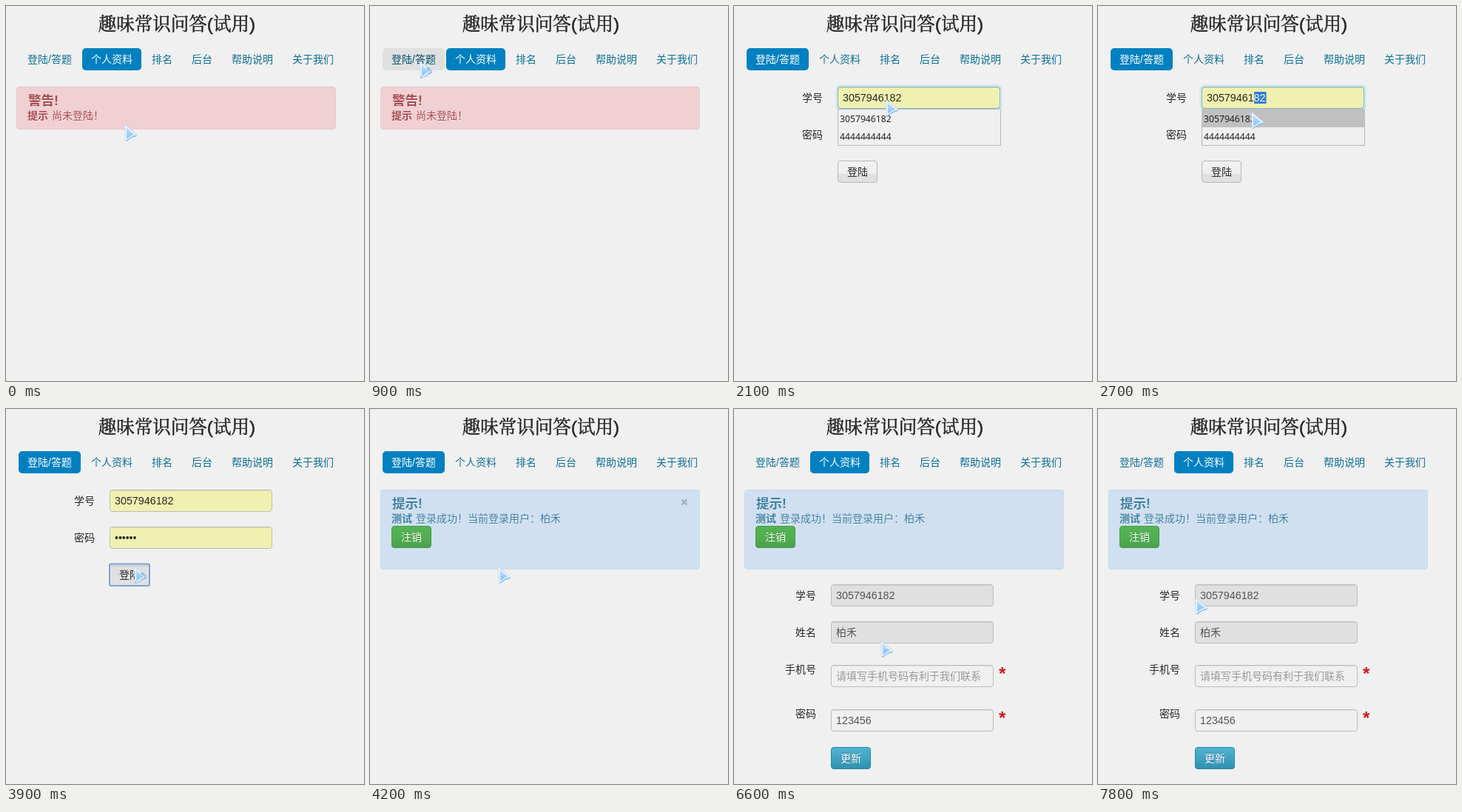
Recreate the animation shown at these times as an HTML page. Size 484x507 px, loop 8000 ms.

```html
<!DOCTYPE html>
<html lang="zh-CN">
<head>
<meta charset="utf-8">
<title>趣味常识问答</title>
<style>
  html, body { margin: 0; width: 100%; height: 100%; overflow: hidden; background: #f0f0f0; }
  svg { display: block; width: 484px; height: 507px; }
  text { font: 14px "Liberation Sans", "Noto Sans CJK SC", "Noto Sans CJK", sans-serif; fill: #282828; white-space: pre; }
  .title { font: 500 24.5px "Liberation Sans", "Noto Serif CJK SC", "Noto Sans CJK SC", serif; text-anchor: middle; fill: #262626; stroke: #262626; stroke-width: .5px; }
  .bold { font-weight: 700; }
  .head { font-size: 17.5px; font-weight: 700; }
  .num { font-size: 14.3px; }
  .list { font: 12.2px "Noto Sans", sans-serif; fill: #222; }
  .warn { fill: #a84a50; text-shadow: 0 1px 0 #fff8; }
  .info { fill: #3e7fa2; text-shadow: 0 1px 0 #fff8; }
  .light { fill: #fff; text-shadow: 0 -1px 0 #0004; }
  .soft { fill: #555; }
  .hint { fill: #999; }
  .star { font-size: 24px; font-weight: 700; fill: #d01818; }
  .nav text { fill: #0e7096; }
  .nav rect { fill: none; }
  .nav.hover rect { fill: #e0e0e0; }
  .nav.hover text { fill: #005070; }
  .nav.active rect { fill: #0080c0; }
  .nav.active text { fill: #fff; }
</style>
</head>
<body>
<svg id="stage" viewBox="0 0 484 507" xmlns="http://www.w3.org/2000/svg"></svg>
<script>
const LOOP = 8000;
const ID = '3057946182', OTHER_ID = '4444444444', USER = '柏禾';
const NAV = [
  ['登陆/答题', 17, 84], ['个人资料', 103, 80], ['排名', 185, 52],
  ['后台', 239, 52], ['帮助说明', 293, 80], ['关于我们', 375, 80]
];

// time, cursor x, cursor y, state tokens
const STEPS = [
  [0, 160, 161, 'warn'],
  [300, 152, 149, 'warn'],
  [600, 103, 102, 'warn'],
  [900, 67, 76, 'warn hover0 link'],
  [1200, 68, 77, 'login'],
  [1500, 161, 140, 'login'],
  [1800, 205, 127, 'login'],
  [2100, 205, 127, 'login focus drop'],
  [2400, 206, 141, 'login focus drop select'],
  [2700, 207, 144, 'login focus drop select row'],
  [3000, 185, 202, 'login focus select'],
  [3300, 172, 214, 'login focus link'],
  [3600, 173, 214, 'login press link'],
  [4200, 173, 214, 'info'],
  [5100, 173, 207, 'info'],
  [5700, 152, 82, 'info'],
  [6000, 147, 72, 'info hover1 link'],
  [6300, 187, 207, 'form'],
  [6600, 198, 314, 'form'],
  [6900, 204, 371, 'form'],
  [7200, 209, 422, 'form'],
  [7500, 209, 424, 'form'],
  [7800, 131, 256, 'form']
].map(([t, x, y, s]) => ({ t, x, y, on: new Set(s.split(' ')) }));

const text = (x, y, s, cls = '') => `<text x="${x}" y="${y}" class="${cls}">${s}</text>`;
const box = (x, y, w, h, fill, stroke = 'none', r = 3.5) =>
  `<rect x="${x + .5}" y="${y + .5}" width="${w - 1}" height="${h - 1}" rx="${r}" fill="${fill}" stroke="${stroke}"/>`;
const when = (tokens, ...parts) => `<g data-on="${tokens}">${parts.join('')}</g>`;
const field = (x, y, fill, stroke = '#bcbcb8') =>
  box(x, y, 220, 30, fill, stroke) +
  `<path d="M${x + 3} ${y + 1.5}h214" stroke="#000" opacity=".07"/>`;
const button = (x, y, label, fill, stroke, cls) =>
  box(x, y, 54, 30, `url(#${fill})`, stroke) + text(x + 13, y + 20, label, cls);
const grad = (id, ...stops) =>
  `<linearGradient id="${id}" x2="0" y2="1">${stops.map(([o, c]) =>
    `<stop offset="${o}" stop-color="${c}"/>`).join('')}</linearGradient>`;

const stage = document.getElementById('stage');
stage.innerHTML = [
  '<defs>',
  grad('plain', [0, '#f2f2f2'], [.6, '#efefef'], [.62, '#e0e0e0'], [1, '#e0e0e0']),
  grad('green', [0, '#54b454'], [.5, '#50b050'], [1, '#4ca04c']),
  grad('blue', [0, '#52b4d4'], [1, '#2f90b0']),
  grad('ice', [0, '#d8eefc'], [.5, '#a0d0f8'], [1, '#78b8f0']),
  '</defs>',
  '<rect width="484" height="507" fill="#f0f0f0"/>',
  text(231, 33, '趣味常识问答(试用)', 'title'),
  ...NAV.map(([label, x, w]) =>
    `<g class="nav"><rect x="${x}" y="57" width="${w}" height="30" rx="5"/>${text(x + 12, 77, label)}</g>`),

  when('warn',
    box(14, 109, 432, 58, '#f0d0d2', '#e8c8cc'),
    text(30, 134, '警告!', 'head warn'),
    text(29, 153, '提示', 'bold warn'),
    text(62, 153, '尚未登陆！', 'warn')),

  when('login',
    text(92, 129, '学号'), text(92, 179, '密码'),
    when('focus', '<rect x="138.5" y="107.5" width="223" height="33" rx="5" fill="none" stroke="#80c8e8" stroke-width="2" opacity=".3"/>'),
    field(140, 109, '#f0f0b0'),
    when('focus', box(140, 109, 220, 30, 'none', '#78b8cc')),
    text(147, 129, ID, 'num'),
    when('select',
      '<rect x="211" y="116" width="16.5" height="16" fill="#3080d8"/>',
      text(210.6, 129, ID.slice(8), 'num light')),
    field(140, 159, '#f0f0b0'),
    text(147, 179, '••••••'),
    button(140, 209, '登陆', 'plain', '#b8b8b8'),
    when('press',
      '<rect x="140" y="209.5" width="54" height="29.5" rx="2" fill="#e0e0e0" stroke="#80a4d0" stroke-width="2"/>',
      '<path d="M142 212h50" stroke="#d0d0d0" stroke-width="2"/>',
      text(153, 229, '登陆')),
    when('drop',
      box(140, 139, 221, 50, '#f0f0f0', '#b8b8b8', 0),
      when('row', '<rect x="140" y="139" width="221" height="25" fill="#c0c0c0"/>'),
      text(143, 157, ID, 'list'),
      text(143, 181, OTHER_ID, 'list'))),

  when('info form',
    box(14, 109, 432, 108, '#d0e0f0', '#c4dcea'),
    text(30, 134, '提示!', 'head info'),
    text(29, 153, '测试', 'bold info'),
    text(62, 153, `登录成功！当前登录用户：${USER}`, 'info'),
    button(29, 158, '注销', 'green', '#489848', 'light')),
  when('info', '<path d="M421.5 122.5l7 7m0-7l-7 7" stroke="#a4b2c0" stroke-width="2.6"/>'),

  when('form',
    text(83, 257, '学号'), field(131, 237, '#e0e0e0'), text(138, 257, ID, 'num soft'),
    text(83, 307, '姓名'), field(131, 287, '#e0e0e0'), text(138, 307, USER, 'soft'),
    text(69, 357, '手机号'), field(131, 346, '#f0f0f0'),
    text(138, 366, '请填写手机号码有利于我们联系', 'hint'), text(358, 366, '*', 'star'),
    text(83, 417, '密码'), field(131, 406, '#f0f0f0'),
    text(138, 426, '123456', 'num soft'), text(358, 426, '*', 'star'),
    button(131, 457, '更新', 'blue', '#2c84a0', 'light')),

  '<g id="cursor" stroke-linejoin="round" stroke-linecap="round">',
  '<path d="M1.5 1.5L15.5 13.5L9 15.5L2.5 20.5Z" fill="url(#ice)" stroke="#b8d8f4" stroke-width="3"/>',
  '<path d="M1.5 1.5L15.5 13.5L9 15.5L2.5 20.5Z" fill="none" stroke="#f6fbff" stroke-width="1.4"/>',
  '<path d="M3 21L9.5 16.5L16 14.2" fill="none" stroke="#88bcec" stroke-width="1.5"/>',
  when('link',
    '<path d="M2.5 20L8 18L15 12L11 8" fill="none" stroke="#88bcec" stroke-width="3"/>',
    '<path d="M3 20L8 17.5L14 12" fill="none" stroke="#f4faff" stroke-width="1.4"/>'),
  '</g>'
].join('');

const cursor = document.getElementById('cursor');
const navs = [...stage.querySelectorAll('.nav')];
const parts = [...stage.querySelectorAll('[data-on]')].map(el => [el, el.dataset.on.split(' ')]);
let shown;

function show({ x, y, on }) {
  for (const [el, tokens] of parts) el.style.display = tokens.some(k => on.has(k)) ? '' : 'none';
  const active = on.has('login') || on.has('info') ? 0 : 1;
  navs.forEach((el, i) => {
    el.setAttribute('class', 'nav' + (i === active ? ' active' : on.has('hover' + i) ? ' hover' : ''));
  });
  cursor.setAttribute('transform', `translate(${x} ${y})`);
}

function tick() {
  const t = performance.now() % LOOP;
  const step = STEPS.findLast(s => s.t <= t);
  if (step !== shown) show(shown = step);
  requestAnimationFrame(tick);
}
tick();
</script>
</body>
</html>
```
